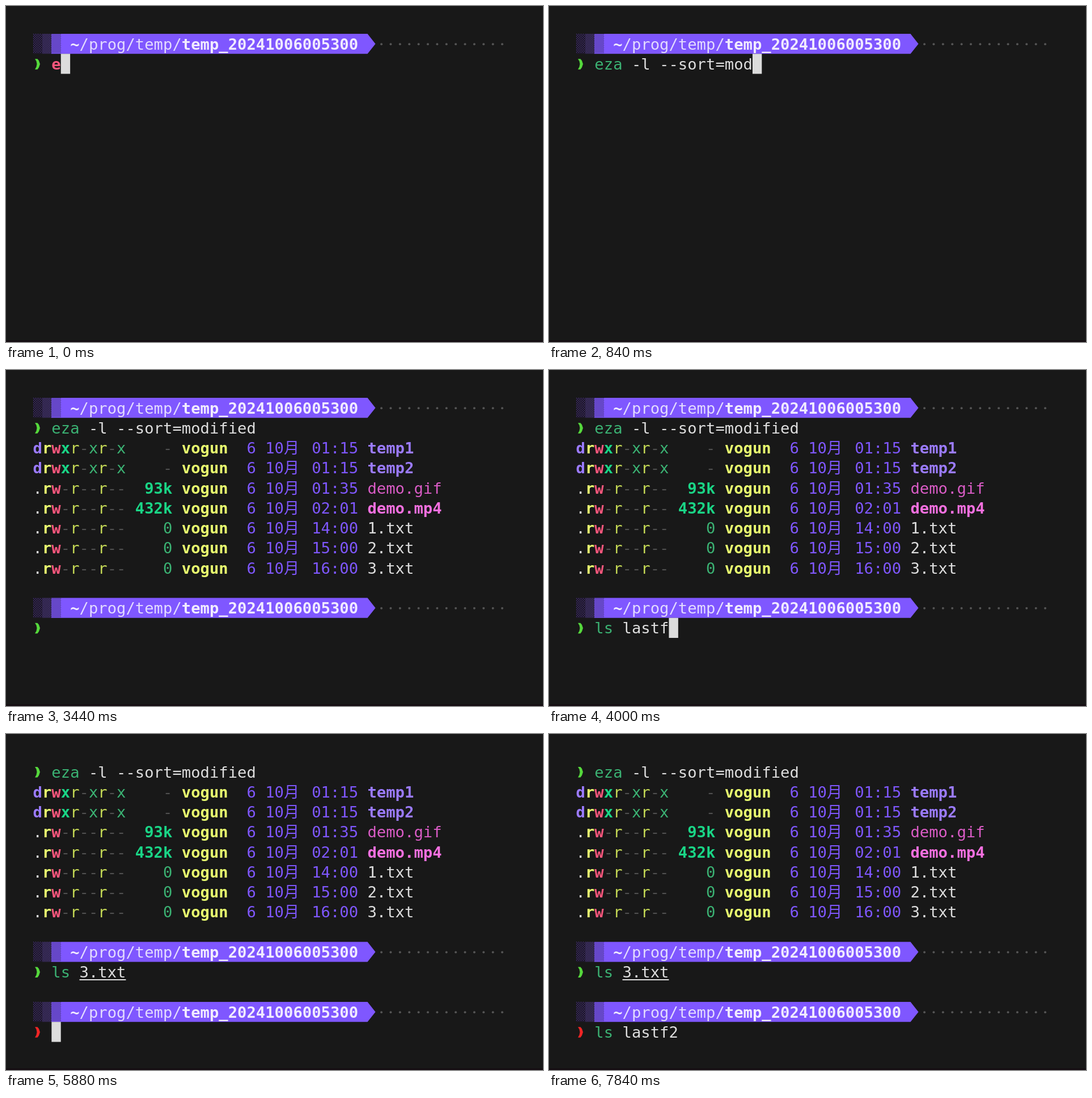
An HTML page with a canvas for the animation above (8 s loop, 947 px wide and 592 px high).

```html
<!DOCTYPE html>
<html lang="en">
<head>
<meta charset="utf-8">
<title>Terminal session</title>
<style>
  html, body { margin: 0; height: 100%; overflow: hidden; background: #181818; }
  canvas { display: block; }
</style>
</head>
<body>
<canvas id="stage" width="947" height="592"></canvas>
<script>
const ctx = document.getElementById('stage').getContext('2d');
const LOOP = 8000, LEFT = 47.6, TOP = 49, CELL = 16.385, LINE = 35.25;
const LIGHT = 300, REGULAR = 400, BOLD = 700;
const C = {
  bg: '#181818', text: '#dedede', purple: '#7f57ff', lilac: '#9b7bff',
  yellow: '#e8fb6f', lime: '#c5d956', pink: '#f9577d', mint: '#1ad586',
  green: '#3bb273', gray: '#505050', orchid: '#da5cc6', magenta: '#f570e0',
  prompt: '#55d83c', error: '#f02525', bar: '#f1ebff'
};
const COMMAND = 'eza -l --sort=modified';
const FILES = [
  ['d', '-', '01:15', 'temp1', C.lilac, BOLD],
  ['d', '-', '01:15', 'temp2', C.lilac, BOLD],
  ['.', '93k', '01:35', 'demo.gif', C.orchid, REGULAR],
  ['.', '432k', '02:01', 'demo.mp4', C.magenta, BOLD],
  ['.', '0', '14:00', '1.txt', C.text, REGULAR],
  ['.', '0', '15:00', '2.txt', C.text, REGULAR],
  ['.', '0', '16:00', '3.txt', C.text, REGULAR]
];

const colX = col => LEFT + col * CELL;
const rowY = row => TOP + row * LINE;

function rect(x, y, w, h, color) {
  ctx.fillStyle = color;
  ctx.fillRect(x, y, w, h);
}

function shape(points, color) {
  ctx.fillStyle = color;
  ctx.beginPath();
  for (const [x, y] of points) ctx.lineTo(x, y);
  ctx.fill();
}

// One glyph per terminal cell
function write(str, col, row, color, weight = REGULAR) {
  ctx.font = `${weight} 27.2px "DejaVu Sans Mono", "Noto Sans CJK JP", "Noto Sans CJK SC", monospace`;
  ctx.fillStyle = color;
  [...str].forEach((ch, i) => ctx.fillText(ch, colX(col + i), rowY(row) + 27.7));
}

function cursor(col, row) {
  rect(colX(col), rowY(row), CELL, LINE, '#dcdcdc');
}

// Dotted shading of one cell
function shade(col, y, base, dot, step) {
  const x0 = Math.round(colX(col)), x1 = Math.round(colX(col + 1));
  rect(x0, y, x1 - x0, LINE, base);
  for (let j = 0; j < 17; j++)
    for (let x = x0 + (j % 2) * step / 2; x < x1; x += step)
      rect(x, Math.round(y) + j * 2, 1, 1, dot);
}

function header(row) {
  const y = rowY(row), x = Math.round(colX(3));
  shade(0, y, '#20192e', '#584095', 4);
  shade(1, y, '#32274e', '#41306c', 4);
  shade(2, y, '#7350e3', '#3f2e78', 2);
  shape([[x, y], [637.5, y], [651.5, y + LINE / 2], [637.5, y + LINE], [x, y + LINE]], C.purple);
  write('~', 4, row, C.bar, BOLD);
  write('/prog/temp/', 5, row, '#e3dbff');
  write('temp_20241006005300', 16, row, C.bar, BOLD);
  ctx.fillStyle = '#555';
  for (let col = 37; col <= 50; col++) {
    ctx.beginPath();
    ctx.arc(colX(col + 0.5), y + 18.3, 2, 0, 7);
    ctx.fill();
  }
}

function prompt(row, color = C.prompt) {
  const y = rowY(row);
  shape([[51, y + 9], [55.5, y + 9], [58, y + 12], [60, y + 18], [58, y + 24],
    [55.5, y + 27.5], [51, y + 27.5], [53.5, y + 23], [54.5, y + 18], [53.5, y + 13]], color);
}

// The command name is red until it is complete
function command(str, size, row) {
  const done = str.length >= size;
  write(str.slice(0, size), 2, row, done ? C.green : C.pink, done ? REGULAR : BOLD);
  write(str.slice(size), 2 + size, row, C.text);
}

function listing(row) {
  FILES.forEach(([type, size, time, name, color, weight], i) => {
    const r = row + i, dir = type === 'd', big = size.endsWith('k');
    write(type, 0, r, dir ? C.lilac : C.text, dir ? BOLD : REGULAR);
    write('r', 1, r, C.yellow, BOLD);
    write('w', 2, r, C.pink, BOLD);
    write(dir ? 'x' : '-', 3, r, dir ? C.mint : C.gray, dir ? BOLD : REGULAR);
    for (const col of [4, 7]) {
      write('r', col, r, C.lime);
      write('-', col + 1, r, C.gray);
      write(dir ? 'x' : '-', col + 2, r, dir ? C.green : C.gray);
    }
    write(size, 15 - size.length, r, dir ? C.gray : big ? C.mint : C.green, big ? BOLD : REGULAR);
    write('vogun', 16, r, C.yellow, BOLD);
    write('6 10', 23, r, C.purple);
    write('月', 27, r, C.purple, LIGHT);
    write(time, 30, r, C.purple);
    write(name, 36, r, color, weight);
  });
}

function expanded(row) {
  command('ls 3.txt', 2, row);
  rect(colX(5), rowY(row) + 30.5, 5 * CELL, 2, C.text);
}

// Number of evenly spaced steps made so far, the first at start, the last at end
function steps(t, start, end, count) {
  if (t < start) return 0;
  return Math.min(count, Math.floor((t - start) / (end - start) * (count - 1) + 1e-6) + 1);
}

function typed(str, t, start, end, count) {
  return str.slice(0, Math.floor(steps(t, start, end, count) * str.length / count));
}

function draw(t) {
  rect(0, 0, 947, 592, C.bg);
  rect(0, 589, 947, 3, '#150e12');
  const scroll = t >= 5880 ? 1 : 0;

  if (!scroll) header(0);
  prompt(1 - scroll);
  const length = 1 + steps(t, 40, 840, 16) + steps(t, 920, 1120, 5);
  command(COMMAND.slice(0, length), 3, 1 - scroll);
  if (t < 1680) return cursor(2 + length, 1);

  listing(2 - scroll);
  header(10 - scroll);
  prompt(11 - scroll);
  if (t >= 5040) expanded(11 - scroll);

  if (!scroll) {
    const str = t < 5040 ? typed('ls lastf', t, 3600, 4000, 6) : 'ls 3.txt';
    if (t < 5040) command(str, 2, 11);
    const hidden = (t >= 2280 && t < 2840) || (t >= 3440 && t < 3600) ||
      (t >= 4600 && t < 5040) || t >= 5640;
    if (!hidden) cursor(2 + str.length, 11);
    return;
  }

  header(12);
  prompt(13, C.error);
  const str = typed('ls lastf2', t, 6840, 7240, 8);
  command(str, 2, 13);
  if (!((t >= 6480 && t < 6840) || t >= 7840)) cursor(2 + str.length, 13);
}

const began = performance.now();
function tick() {
  draw((performance.now() - began) % LOOP);
  requestAnimationFrame(tick);
}
tick();
</script>
</body>
</html>
```
